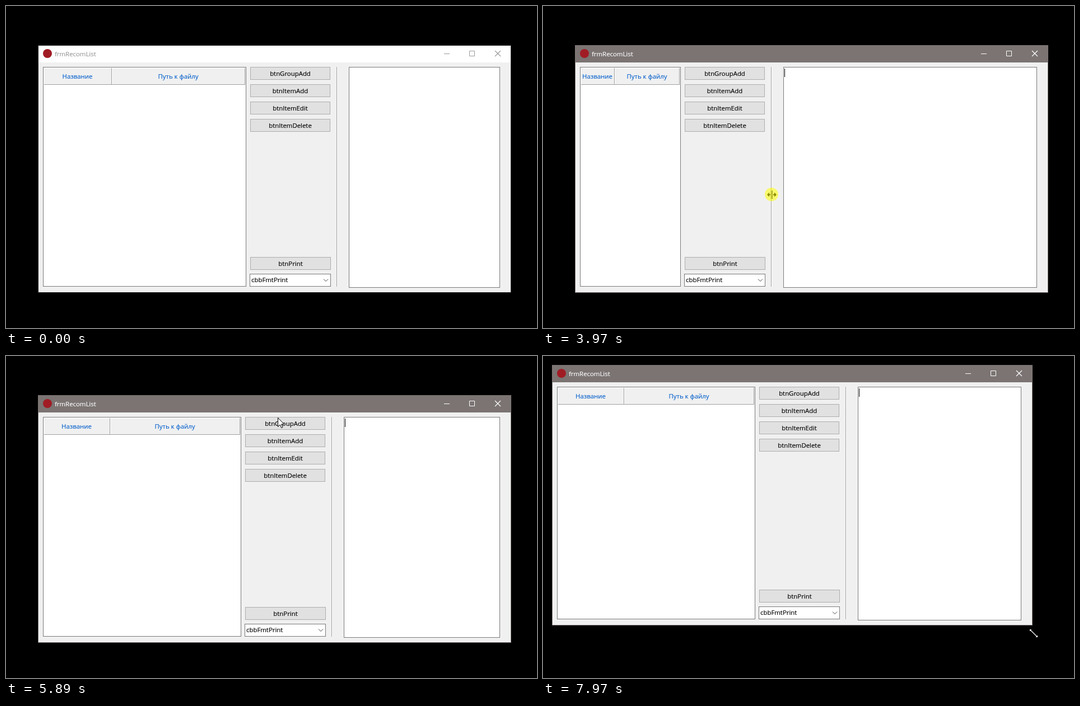
Animation of 948 by 576 pixels, one loop 8000 ms. Source, as an HTML page:

```html
<!DOCTYPE html>
<html lang="ru">
<head>
<meta charset="utf-8">
<title>frmRecomList</title>
<style>
  html, body { margin: 0; width: 100%; height: 100%; overflow: hidden; background: #000; }
  svg { display: block; width: 100vw; height: 100vh; }
  text { font: 11.4px "Open Sans", "Noto Sans", sans-serif; }
</style>
</head>
<body>
<svg id="stage" viewBox="0 0 948 576"></svg>
<script>
const LOOP = 8000, TICK = 40, PHASE = 10, BLINK = 540;
const HOME = { x: 57, y: 70, w: 845, h: 443 };
const FACE = '#f0f0f0', EDGE = '#7a7a7a', SHADOW = '#a0a0a0';

// Moments of the story, in ms
const ENTER = 530, CLICK = 1330, RELEASE = 1490;
const DRAG = 3490, DROP = 5330, BLINK_AGAIN = 5510;
const LIFT = 5970, LAND = 6410, RESIZE = 7770;

// Pointer stops: time, x, y; it eases from one to the next
const STOPS = [
  [ENTER, 535, 366], [970, 397, 79], [RELEASE, 397, 79], [1890, 416, 87], [2410, 598, 324],
  [2770, 591, 344], [DRAG, 591, 344], [3930, 408, 337], [4200, 408, 337], [4570, 660, 342],
  [5130, 584, 336], [DROP, 582, 336], [5450, 582, 336], [LIFT, 478, 95], [6130, 450, 56],
  [LAND, 437, 41], [6570, 437, 41], [6970, 846, 399], [7130, 846, 399], [7610, 860, 462],
  [RESIZE, 860, 462], [7970, 876, 496]
];

const clamp = (v, lo, hi) => Math.min(hi, Math.max(lo, v));
const ease = k => k * k * (3 - 2 * k);
const progress = (t, from, to) => ease(clamp((t - from) / (to - from), 0, 1));

function pointerAt(t) {
  const i = clamp(STOPS.findIndex(stop => stop[0] > t), -1, STOPS.length);
  if (i === 0) return STOPS[0].slice(1);
  const [t0, x0, y0] = STOPS[i < 0 ? STOPS.length - 2 : i - 1];
  const [t1, x1, y1] = STOPS[i < 0 ? STOPS.length - 1 : i];
  const k = progress(t, t0, t1);
  return [Math.round(x0 + (x1 - x0) * k), Math.round(y0 + (y1 - y0) * k)];
}

// The splitter follows the dragging pointer with a repaint delay
const splitterAt = (t, delay) => pointerAt(clamp(t - delay, DRAG, DROP))[0] - 1 - HOME.x;

function caretShown(t) {
  if (t < CLICK) return false;
  if (t >= DRAG && t < BLINK_AGAIN) return true;
  const since = t < DRAG ? CLICK : BLINK_AGAIN;
  return Math.floor((t - since) / BLINK) % 2 === 0;
}

const rect = (x, y, w, h, fill) =>
  `<rect x="${x}" y="${y}" width="${w}" height="${h}" fill="${fill}"/>`;
const box = (x, y, w, h, fill, edge) =>
  rect(x, y, w, h, edge) + rect(x + 1, y + 1, w - 2, h - 2, fill);
const text = (x, y, str, fill = '#000', anchor = 'start') =>
  `<text x="${x}" y="${y}" fill="${fill}" stroke="${fill}" stroke-width=".15" text-anchor="${anchor}">${str}</text>`;
const line = (d, color, width = 1) =>
  `<path d="${d}" fill="none" stroke="${color}" stroke-width="${width}"/>`;
const shape = (d, fill, edge = 'none') => `<path d="${d}" fill="${fill}" stroke="${edge}"/>`;
const button = (x, y, w, label) =>
  box(x, y, w, 23, '#e1e1e1', '#adadad') + text(x + w / 2, y + 16, label, '#000', 'middle');

function windowFrame(w, h, active) {
  const ink = active ? '#fff' : '#999', bar = active ? '#7b7473' : '#fff';
  return rect(0, 0, w, h, active ? bar : '#222') +
    rect(1, 1, w - 2, 30, bar) + rect(1, 31, w - 2, h - 32, FACE) +
    '<circle cx="17" cy="15" r="8" fill="#a01c24"/>' +
    text(30, 20, 'frmRecomList', ink) +
    rect(w - 120, 15, 10, 1, ink) +
    line(`M${w - 74.5} 10.5h9v9h-9z`, ink) +
    line(`M${w - 29} 10l10 10m0-10l-10 10`, ink, 1.2);
}

function grid(right, h) {
  const end = right - 3, col = 11 + Math.round((right - 12) / 3);
  const blue = '#0a62cc';
  return box(9, 39, right - 9, h - 50, '#fff', EDGE) +
    rect(11, 41, end - 11, 29, FACE) + rect(11, 70, end - 10, 1, SHADOW) +
    rect(col, 41, 1, 30, SHADOW) + rect(col + 1, 41, 1, 29, '#fff') +
    rect(end, 41, 1, 30, SHADOW) +
    text((10 + col) / 2, 60, 'Название', blue, 'middle') +
    text((col + right - 2) / 2, 60, 'Путь к файлу', blue, 'middle');
}

const itemButtons = x =>
  ['btnGroupAdd', 'btnItemAdd', 'btnItemEdit', 'btnItemDelete']
    .map((label, i) => button(x, 39 + 31 * i, 143, label)).join('');

const combo = (x, y) =>
  box(x, y, 145, 23, '#fff', EDGE) + text(x + 3, y + 15, 'cbbFmtPrint') +
  line(`M${x + 132} ${y + 9.5}l4 4l4-4`, '#444');

// Grid edge painted ahead of the rest of the form
const smear = (from, to, h) =>
  rect(from, 39, to - from, 1, EDGE) + rect(from, h - 12, to - from, 1, EDGE) +
  rect(to - 2, 40, 1, h - 52, '#fff') + rect(to - 1, 39, 1, h - 50, EDGE) +
  rect(to, 39, 6, h - 50, FACE);

function form(t) {
  const grown = progress(t, RESIZE, 7970);
  const w = HOME.w + Math.round(13 * grown), h = HOME.h + Math.round(23 * grown);
  const split = splitterAt(t, 36), ahead = splitterAt(t, 18) - split;
  const right = split - 161, memo = split + 22;

  let out = windowFrame(w, h, t >= CLICK) + grid(right, h) +
    rect(split, 39, 1, h - 50, SHADOW) + rect(split + 1, 39, 1, h - 50, '#fff') +
    box(memo, 39, w - 20 - memo, h - 48, '#fff', EDGE) +
    itemButtons(right + 7) + combo(right + 6, h - 34);
  if (ahead > 1) out += smear(right, right + ahead, h) + itemButtons(right + ahead + 7);
  out += button(right + 7, h - 64, 144, 'btnPrint');
  if (caretShown(t)) out += rect(memo + 2, 42, 1, 15, '#000');
  return out;
}

const doubleArrow = 'M-7.5-7.5h5l-5 5zM7.5 7.5h-5l5-5z';
const CURSORS = {
  arrow: shape('M.5 .5V16.5L4.2 13L6.7 18.5L9 17.5L6.6 12H11.5Z', '#fff', '#000'),
  split: rect(-1, -7, 1, 15, '#000') + rect(1, -7, 1, 15, '#000') +
    shape('M-8 .5l4-4v3h2v2h-2v3zM9 .5l-4-4v3h-2v2h2v3z', '#000'),
  size: line('M-6-6L6 6', '#000', 3) + shape(doubleArrow, '#fff', '#000') +
    line('M-6-6L6 6', '#fff', 1.2)
};

function cursor(t) {
  if (t < ENTER) return '';
  const [x, y] = pointerAt(t);
  const kind = t >= 7450 ? 'size' : t >= 2610 && t < 5480 ? 'split' : 'arrow';
  const pressed = (t >= CLICK && t < RELEASE) || (t >= DRAG && t < DROP);
  const glow = pressed ? '<circle r="12" fill="#ff0" opacity=".55"/>' : '';
  return `<g transform="translate(${x} ${y})">${CURSORS[kind]}${glow}</g>`;
}

function scene(t) {
  const [grabX, grabY] = pointerAt(LIFT);
  const [x, y] = pointerAt(clamp(t, LIFT, LAND));
  const origin = `${HOME.x + x - grabX} ${HOME.y + y - grabY}`;
  return `<g transform="translate(${origin})">${form(t)}</g>${cursor(t)}`;
}

const stage = document.getElementById('stage');
const start = performance.now();
let shown = null;

function update() {
  const t = (performance.now() - start) % LOOP;
  const tick = Math.max(0, Math.floor((t - PHASE) / TICK) * TICK + PHASE);
  if (tick !== shown) {
    stage.innerHTML = scene(tick);
    shown = tick;
  }
  requestAnimationFrame(update);
}
update();
</script>
</body>
</html>
```
